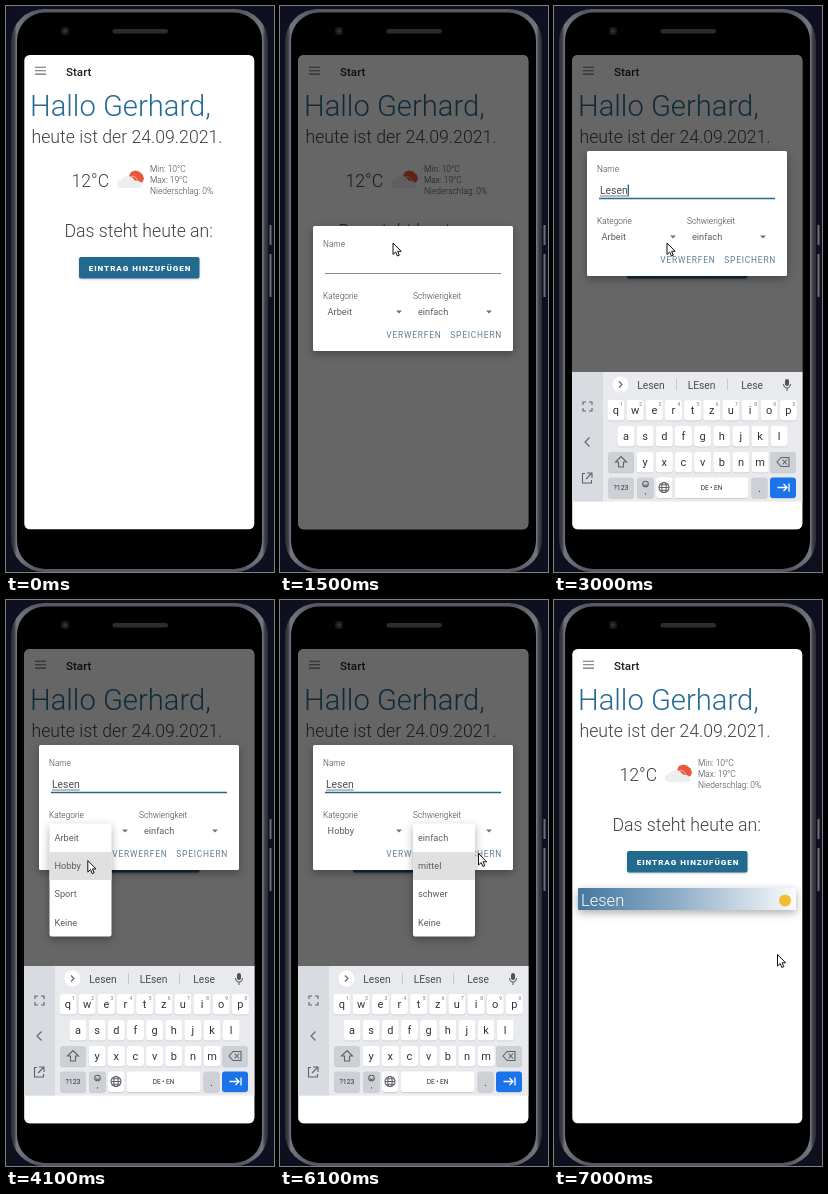
Write an HTML page that moves like this. It is 268 by 566 pixels and loops after 7200 ms.

```html
<!DOCTYPE html>
<html lang="de">
<head>
<meta charset="utf-8">
<title>Eintrag hinzufügen</title>
<style>
  html, body { margin: 0; width: 100%; height: 100%; overflow: hidden; background: #0e1020; }
  svg { display: block; width: 268px; height: 566px; font-family: Roboto, sans-serif; }
  .light { font-weight: 300; fill: #3f4247; }
  .small { font-size: 8.45px; }
  .label { font-size: 8.3px; font-weight: 300; fill: #3c3f44; }
  .value { font-size: 9.2px; fill: #5a5d61; }
  .action { font-size: 8.4px; letter-spacing: .8px; fill: #5f7d93; }
  .mid { text-anchor: middle; }
  .icon { fill: none; stroke: #5f6368; stroke-width: 1.1; }
  .raised { filter: drop-shadow(0 3px 4px rgba(0,0,0,.32)); }
</style>
</head>
<body>
<svg viewBox="0 0 268 566">
  <defs>
    <clipPath id="screenClip"><rect x="18.300" y="49" width="230" height="474.300" rx="5.500"/></clipPath>
    <linearGradient id="entryFill">
      <stop offset="0" stop-color="#44779f"/><stop offset=".45" stop-color="#8eadc7"/><stop offset="1" stop-color="#fafbfd"/>
    </linearGradient>
    <linearGradient id="rim">
      <stop offset="0" stop-color="#2b2e36"/><stop offset=".012" stop-color="#3b3e46"/><stop offset=".022" stop-color="#74777f"/>
      <stop offset=".1" stop-color="#565962"/><stop offset=".9" stop-color="#565962"/>
      <stop offset=".978" stop-color="#74777f"/><stop offset=".988" stop-color="#3b3e46"/><stop offset="1" stop-color="#2b2e36"/>
    </linearGradient>
  </defs>

  <rect width="268" height="566" fill="#0e1020"/>
  <path d="M264.500 219v20M264.500 248v43" stroke="#6d7078" stroke-width="2"/>
  <rect x="5" y="3" width="257" height="563" rx="33" fill="url(#rim)"/>
  <rect x="11" y="6.500" width="245" height="556.500" rx="28" fill="#000"/>
  <circle cx="59" cy="25" r="4" fill="#1b1d23"/>
  <circle cx="59" cy="25" r="1.6" fill="#343946"/>
  <rect x="106.500" y="23" width="55.500" height="4.500" rx="2.200" fill="#2b2c30"/>

  <g clip-path="url(#screenClip)">
    <rect x="18" y="49" width="231" height="475" fill="#fff"/>
    <path d="M29 61.300h11M29 64.700h11M29 68.100h11" stroke="#686b6f" stroke-width="1.100"/>
    <text x="60" y="69.500" font-size="11.600" font-weight="500" fill="#202124">Start</text>
    <text x="24" y="109.500" font-size="29.200" font-weight="300" fill="#266b91">Hallo Gerhard,</text>
    <g class="light" font-size="17.700">
      <text x="25.500" y="136.500">heute ist der 24.09.2021.</text>
      <text x="65.500" y="181">12°C</text>
      <text x="58.500" y="231">Das steht heute an:</text>
    </g>
    <path d="M123 170l2-4 4-1.500 4 1 3.500 3 1.500 4-1.500 3.500-3 2z" fill="#e9573c"/>
    <path d="M125 171q5-3 7 6" fill="none" stroke="#f6c9bf" stroke-width=".8"/>
    <path d="M115 182a4 4 0 0 1 0-8q3-5 8-3.500 4 0 5.500 4.500 6-1 8 3.500 0 3.500-4 3.500z" fill="#eceef0"/>
    <g class="light small">
      <text x="144" y="165.500">Min: 10°C</text>
      <text x="144" y="177">Max: 19°C</text>
      <text x="144" y="188.200">Niederschlag: 0%</text>
    </g>
    <rect x="73" y="251" width="120.500" height="21.500" rx="2" fill="#226a90" style="filter:drop-shadow(0 1px 1px rgba(0,0,0,.2))"/>
    <text x="82.700" y="265" font-size="8.100" font-weight="800" letter-spacing=".95" fill="#fff">EINTRAG HINZUFÜGEN</text>

    <g id="entry">
      <rect class="raised" x="24" y="288" width="218" height="22" rx="1" fill="url(#entryFill)"/>
      <text x="27" y="305.500" font-size="16.500" font-weight="300" fill="#fff">Lesen</text>
      <circle cx="231" cy="300.500" r="6" fill="#f2bb32"/>
    </g>

    <rect id="scrim" x="18" y="49" width="231" height="475"/>

    <g id="dialog">
      <rect id="card" class="raised" x="33" width="200" height="125" rx="1.500" fill="#fff"/>
      <g class="label">
        <text x="43" y="21">Name</text>
        <text x="43" y="73">Kategorie</text>
        <text x="133" y="73">Schwierigkeit</text>
      </g>
      <path id="nameLine" d="M45 47.500H221"/>
      <text id="name" x="46" y="43" font-size="10.400" fill="#4a4d52"></text>
      <path id="composing" stroke="#55585c" stroke-width=".8"/>
      <path id="caret" stroke="#24698d" stroke-width="1.300"/>
      <text id="category" class="value" x="47.600" y="89"></text>
      <text id="level" class="value" x="138" y="89"></text>
      <path d="M116 84.500h6l-3 3zM206 84.500h6l-3 3z" fill="#707377"/>
      <g id="clock">
        <text class="label" x="43" y="113">Uhrzeit</text>
        <g font-size="10.800" font-weight="300" fill="#909397">
          <text x="45" y="135">00</text><text x="86" y="136.500">:</text><text x="96" y="135">00</text>
        </g>
        <path d="M45 139.500h36M95 139.500h36" stroke="#a9abae"/>
      </g>
      <g id="actions" class="action"><text x="106.300">VERWERFEN</text><text x="170.300">SPEICHERN</text></g>
    </g>

    <g id="keyboard">
      <rect x="18" y="366" width="231" height="160" fill="#fff"/>
      <rect x="18" y="366" width="231" height="129.500" fill="#e8eaed"/>
      <rect x="18" y="366" width="31" height="129.500" fill="#d8dbdf"/>
      <path class="icon" d="M29 399v-3h3M35 396h3v3M38 402v3h-3M32 405h-3v-3M35.500 431.500l-4.500 4.500 4.500 4.500M31 467.500h-2.500v9.500h9v-3M33 467h5v5M38 467l-6 6"/>
      <circle cx="66.500" cy="378.500" r="8" fill="#fff"/>
      <path class="icon" d="M65 375.500l3 3-3 3"/>
      <path d="M122.500 373v11M173.500 373v11" stroke="#c6c9cd"/>
      <rect x="231" y="373" width="4" height="7" rx="2" fill="#50545a"/>
      <path class="icon" d="M229.500 378q.5 4 3.500 4t3.500-4M233 382v3"/>
      <g id="hints" class="mid" font-size="10.300" fill="#4a4d52"></g>
      <g id="keys" class="mid"></g>
      <path class="icon" d="M67 450.500l5.500 5.500h-3v5h-5v-5h-3zM223 456l4-4.500h8v9h-8zM228.500 453.500l4.500 5M233 453.500l-4.500 5"/>
      <g class="icon" stroke-width=".9">
        <circle cx="91.500" cy="478" r="2.800"/><path d="M90 478.500q1.500 2 3 0"/>
        <circle cx="110" cy="481.500" r="5"/><ellipse cx="110" cy="481.500" rx="2.200" ry="5"/><path d="M105 481.500h10M106 478.700h8M106 484.300h8"/>
      </g>
      <path d="M223.500 481.500h9M229.500 478l3.500 3.500-3.500 3.500M235 477.500v8" fill="none" stroke="#fff" stroke-width="1.300"/>
    </g>

    <g id="categoryMenu" class="raised"></g>
    <g id="levelMenu" class="raised"></g>
  </g>
  <path id="pointer" d="M0 0V11.500L2.700 9 4.400 13 6.300 12.200 4.600 8.300H8.200Z" fill="#fff" stroke="#111" stroke-width="1"/>
</svg>

<script>
const LOOP = 7200, STEP = 100;
const $ = id => document.getElementById(id);
const set = (id, attrs) => Object.entries(attrs).forEach(([k, v]) => $(id).setAttribute(k, v));
const show = (id, on) => set(id, { visibility: on ? 'visible' : 'hidden' });

// Each track is a list of [time, ...values]
const tracks = {
  scrim: [[1100, 0], [1300, .2], [1500, .6], [6400, .6], [6600, 0]],
  dialog: [[1100, 0], [1300, .7], [1400, 1], [6400, 1], [6600, 0]],
  top: [[1300, 197.500], [1500, 220], [2200, 220], [2500, 145]],
  height: [[1300, 178], [1500, 125]],
  clock: [[1300, 1], [1500, 0]],
  keyboard: [[2200, 160], [2500, 0], [6400, 0], [6700, 160]],
  categoryMenu: [[3300, 0], [3500, 1], [4700, 1], [4800, .35], [4900, .16], [5000, .07], [5100, 0]],
  levelMenu: [[5400, 0], [5600, 1], [6200, 1], [6400, 0]],
  entry: [[6500, 0], [6700, 1]],
  pointer: [[200, 228, 350], [800, 128, 259], [1000, 128, 259], [1300, 113, 237], [3500, 113, 237],
    [4200, 80, 262], [4700, 80, 262], [5000, 177.5, 223.500], [5500, 177.5, 223.500],
    [6000, 198.5, 253.500], [6400, 198.5, 253.500], [6800, 223.5, 354.500]],
};

function sample(track, t, ease = u => u) {
  const next = track.findIndex(p => p[0] > t);
  if (next === 0) return track[0].slice(1);
  if (next < 0) return track.at(-1).slice(1);
  const a = track[next - 1], b = track[next];
  const u = ease((t - a[0]) / (b[0] - a[0]));
  return a.slice(1).map((v, i) => v + (b[i + 1] - v) * u);
}
const smooth = u => u * u * (3 - 2 * u);

function key(x, y, w, label, fill = '#fff', size = 11) {
  return `<rect x="${x}" y="${y + .8}" width="${w}" height="20.500" rx="3" fill="#c3c6ca"/>
    <rect x="${x}" y="${y}" width="${w}" height="20.500" rx="3" fill="${fill}"/>
    <text x="${x + w / 2}" y="${y + 10.500 + size * .34}" font-size="${size}" fill="#303338">${label}</text>`;
}

function buildKeys() {
  const pitch = 19.150, grey = '#cdd1d6';
  const row = (letters, x, y) => [...letters].map((c, i) => key(x + i * pitch, y, 17, c)).join('');
  const digits = [...'1234567890'].map((d, i) =>
    `<text x="${67.500 + i * pitch}" y="400" font-size="5" fill="#777">${d}</text>`).join('');
  $('keys').innerHTML = row('qwertzuiop', 53.500, 394) + digits +
    row('asdfghjkl', 63.500, 420) + row('yxcvbnm', 82.700, 446) +
    key(54, 446, 26, '', grey) + key(216, 446, 26, '', grey) +
    key(54, 471.500, 26, '?123', grey, 7) + key(83, 471.500, 17, '', grey) +
    '<text x="91.500" y="488" font-size="8" fill="#303338">,</text>' +
    key(102, 471.500, 16.500, '') + key(120.500, 471.500, 74, 'DE • EN', '#fff', 6.500) +
    key(197.500, 471.500, 16, '.', grey) + key(216, 471.500, 26, '', '#1a73e8');
}

function buildMenu(id, x, items) {
  const rows = items.map((s, i) => `<text class="value" x="${x + 5}" y="${241 + i * 28.200}">${s}</text>`);
  $(id).innerHTML = `<rect x="${x}" y="223.500" width="62" height="113" rx="2" fill="#fff"/>
    <rect id="${id}Hover" x="${x}" y="252" width="62" height="28" fill="#e0e0e0"/>${rows.join('')}`;
}

function render(t) {
  const at = name => sample(tracks[name], t)[0];
  for (const id of ['scrim', 'dialog', 'clock', 'categoryMenu', 'levelMenu', 'entry']) set(id, { opacity: at(id) });
  const height = at('height');
  set('dialog', { transform: `translate(0 ${at('top')})` });
  set('card', { height });
  set('actions', { transform: `translate(0 ${height - 12.700})` });
  set('keyboard', { transform: `translate(0 ${at('keyboard')})` });

  const focused = t >= 1800;
  set('nameLine', { stroke: focused ? '#24698d' : '#85888c', 'stroke-width': focused ? 1.500 : 1 });

  const typed = 'Lesen'.slice(0, Math.max(0, Math.floor((t - 2400) / 100)));
  $('name').textContent = typed;
  const end = 46 + (typed ? $('name').getComputedTextLength() : 0);
  set('composing', { d: `M46 45H${end}` });
  set('caret', { d: `M${end + .6} 33.500V45.500` });
  const menuOpen = (t >= 3400 && t < 4800) || t >= 5500;
  show('caret', focused && !menuOpen);

  const hints = typed ? [typed, typed.slice(0, 2).toUpperCase() + typed.slice(2), typed.slice(0, -1)] : [];
  $('hints').innerHTML = hints.map((s, i) => `<text x="${97 + i * 50.600}" y="382.500">${s}</text>`).join('');

  $('category').textContent = t < 4700 ? 'Arbeit' : 'Hobby';
  $('level').textContent = t < 6200 ? 'einfach' : 'mittel';
  const [x, y] = sample(tracks.pointer, t, smooth);
  set('categoryMenuHover', { opacity: t >= 3900 && t < 4800 ? 1 : 0 });
  set('levelMenuHover', { opacity: t >= 5900 ? 1 : 0 });
  set('pointer', { transform: `translate(${x} ${y})` });
  show('pointer', t >= 200);
}

buildKeys();
buildMenu('categoryMenu', 43.500, ['Arbeit', 'Hobby', 'Sport', 'Keine']);
buildMenu('levelMenu', 133, ['einfach', 'mittel', 'schwer', 'Keine']);

const start = performance.now();
function tick() {
  const t = (performance.now() - start) % LOOP;
  render(Math.floor(t / STEP) * STEP);
  requestAnimationFrame(tick);
}
tick();
</script>
</body>
</html>
```
